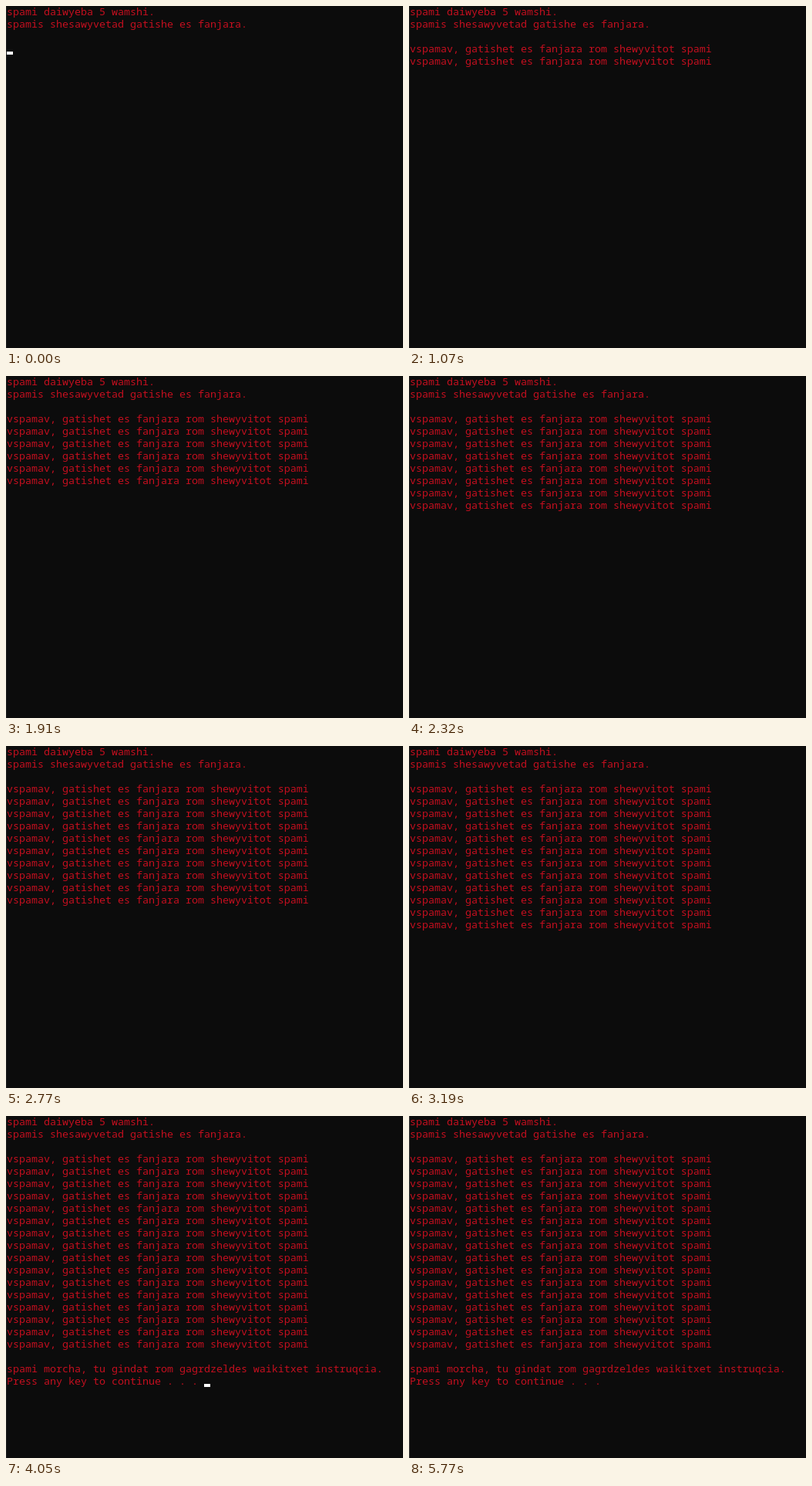
An HTML page with a canvas for the animation above (5.8 s loop, 515 by 443 pixels).

```html
<!DOCTYPE html>
<html lang="en">
<head>
<meta charset="utf-8">
<title>Console</title>
<style>
  html, body { margin: 0; width: 100%; height: 100%; overflow: hidden; background: #0c0c0c; }
  canvas { display: block; }
</style>
</head>
<body>
<canvas id="stage" width="515" height="443"></canvas>
<script>
const ctx = document.getElementById('stage').getContext('2d', { alpha: false });
const LOOP = 5800, CELL = 8, ROW = 16, LEFT = 1, BASELINE = 12;

const intro = ['spami daiwyeba 5 wamshi.', 'spamis shesawyvetad gatishe es fanjara.'];
const spam = 'vspamav, gatishet es fanjara rom shewyvitot spami';
const outro = ['spami morcha, tu gindat rom gagrdzeldes waikitxet instruqcia.',
               'Press any key to continue . . . '];
const printTimes = [830, 1070, 1280, 1490, 1700, 1910, 2110, 2320,
                    2560, 2770, 2980, 3190, 3400, 3600, 3810, 4020];
const OUTRO_AT = 4050, BLUR_AT = 5680;
const cursors = [
  { row: 3, col: 0, from: 0, to: 510 },
  { row: 21, col: 32, from: OUTRO_AT, to: 4670 },
  { row: 21, col: 32, from: 5190, to: 5770 }
];

function print(text, row) {
  ctx.fillText(text, LEFT, row * ROW + BASELINE);
}

function draw(t) {
  ctx.fillStyle = '#0c0c0c';
  ctx.fillRect(0, 0, 515, 443);

  // Window border, brighter once focus is lost
  ctx.fillStyle = t < BLUR_AT ? '#1e1e1e' : '#3c3c3c';
  ctx.fillRect(0, 0, 1, 443);

  ctx.font = '13.333px "Noto Sans Mono", "DejaVu Sans Mono", monospace';
  ctx.fillStyle = '#c50f1f';
  intro.forEach(print);
  printTimes.forEach((at, i) => { if (t >= at) print(spam, 3 + i); });
  if (t >= OUTRO_AT) outro.forEach((text, i) => print(text, 20 + i));

  ctx.fillStyle = '#ffffff';
  for (const c of cursors) {
    if (t >= c.from && t < c.to) ctx.fillRect(LEFT + c.col * CELL, c.row * ROW + 11, CELL, 4);
  }
}

const start = performance.now();
function tick() {
  draw((performance.now() - start) % LOOP);
  requestAnimationFrame(tick);
}
tick();
</script>
</body>
</html>
```
